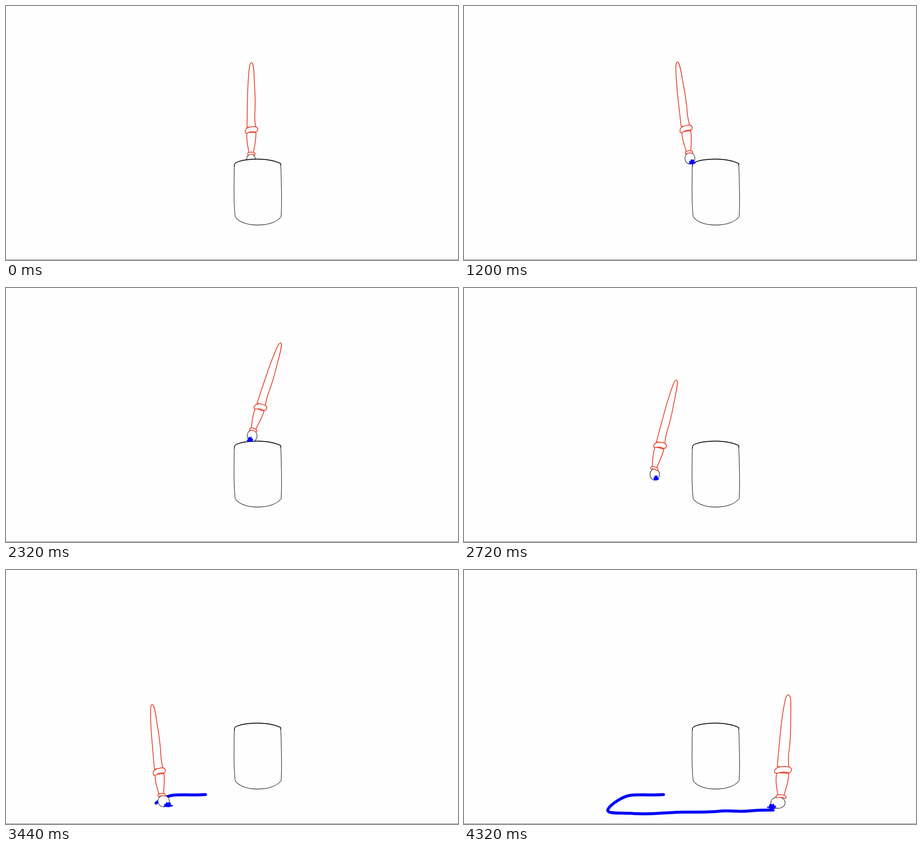
An HTML page for the animation above (4.4 s loop, 997 by 561 pixels).

```html
<!DOCTYPE html>
<html lang="en">
<head>
<meta charset="utf-8">
<title>Paintbrush</title>
<style>
  html, body { margin: 0; width: 100%; height: 100%; overflow: hidden; background: #fefefe; }
  svg { display: block; }
  path, ellipse { fill: #fefefe; stroke-linecap: round; stroke-linejoin: round; vector-effect: non-scaling-stroke; }
  .ink { stroke: #333336; stroke-width: 1.3; }
  #handle path { stroke: #e83824; stroke-width: 1.7; }
  #blob { fill: #0404fa; stroke: #0404fa; stroke-width: 1.5; }
  #trail { fill: none; stroke: #0404fa; stroke-width: 6.5; }
</style>
</head>
<body>
<svg width="997" height="561" viewBox="0 0 997 561">
  <path d="M0 560.5H997" stroke="#777"/>
  <g id="bucket">
    <path class="ink" d="M504 353C503 349 505 347 509 345C530 336 580 335 606 348C607 380 609 420 607 465C590 490 520 490 505.500 465C502 435 503 400 503.500 353Z"/>
    <path d="M504 354C503 349 505 347 509 345C530 336 580 335 606 348V352" style="fill:none" stroke="#222" stroke-width="1.8"/>
  </g>
  <path id="trail" pathLength="512" d="M440 496C415 498 385 495 365 498C345 502 318 522 317 531C318 539 345 536 375 538S450 536 470 535S530 536 560 533S600 535 630 532S670 531 688 530"/>
  <g id="bristles">
    <ellipse id="ball" class="ink" ry="12.5" cy="12.5"/>
    <path id="blob" d="M-1 .5L-.5 .2L-.4-.8L-.1-.9L.1-.4L.4-1L.5-.2L.95 0L.7 .4L1 .9L-.2 1Z"/>
  </g>
  <g id="handle">
    <path d="M-10-60C-9-100-9-140-7-165C-5-190-4-204 .5-204C5-204 6-190 7-165C9-130 10-110 8-85C8-75 9-68 10-60Z"/>
    <path d="M-5.500-3C-8-20-12-28-10-48H11C11-30 8-20 5-3Z"/>
    <path d="M-14-50C-14-58-5-61 3-61C10-62 15-60 15-55C15-49 9-49 5-50C-3-51-6-47-10-46.500C-13-46-14-48-14-50Z"/>
    <path d="M-7-3C-4-5 4-5 7-3C10-2 9 3 7 2C3 0-3 0-6 2C-9 3-9-2-7-3Z"/>
  </g>
</svg>
<script>
const [bucket, trail, bristles, ball, blob, handle] =
  ['bucket', 'trail', 'bristles', 'ball', 'blob', 'handle'].map(id => document.getElementById(id));

// Drawings change about every 1.6 units of 80 ms
const LOOP = 4400, UNIT = 80, PACE = 1.6;
const PAINT_START = 24, TURN = 28;

// Turning points: drawing, ferrule x and y, lean in degrees, sideways bend of the bristles
const poses = [
  [0, 541, 327, 0, -.1],
  [7, 534, 327, 0, .1],
  [9, 496, 324, -7.4, .5],
  [11, 471, 316, 19, -.4],
  [13, 467, 309, 34, -.8],
  [15, 509, 325, 26, -.6],
  [18, 545, 314, 17.4, -.45],
  [19, 474, 318, 20, -.3],
  [22, 392, 440, 11, .6],
  [24, 411, 474, -9.7, 1.1],
  [27, 343, 498, -6, 1],
  [30, 500, 510, 28.4, -1.4],
  [31, 603, 513, 37, -1.4],
  [34, 699, 501.5, 4, -1]
];

function poseAt(k) {
  const i = Math.max(1, poses.findIndex(pose => pose[0] >= k));
  const a = poses[i - 1], b = poses[i], f = (k - a[0]) / (b[0] - a[0]);
  return a.slice(1).map((v, j) => v + (b[j + 1] - v) * f);
}

function smoothstep(from, to, v) {
  const f = Math.min(1, Math.max(0, (v - from) / (to - from)));
  return f * f * (3 - 2 * f);
}

function draw(k) {
  const [x, y, lean, bend] = poseAt(k);
  const near = smoothstep(TURN - 1, TURN + 2, k); // the brush comes closer while painting
  const width = .95 + .33 * near, length = .99 + .12 * near;
  const press = Math.abs(bend);

  handle.setAttribute('transform', `translate(${x} ${y}) rotate(${lean}) scale(${width} ${length})`);
  bristles.setAttribute('transform', `translate(${x} ${y})`);
  ball.setAttribute('cx', 5 * bend * width);
  ball.setAttribute('rx', 10 * width + 3 * press);
  const half = -Math.sign(bend) * (4 + 6 * Math.min(1, press));
  blob.setAttribute('transform', `translate(${16 * bend * width} 20) scale(${half} 5)`);

  // Even pace to the left, then the paint follows the brush to the right
  const painted = k < TURN ? 38 * Math.max(0, k - PAINT_START) : x - 193;
  trail.setAttribute('stroke-dasharray', `${painted} 999`);
  trail.style.opacity = painted > 0 ? 1 : 0;
  // While dipping, the bristles are inside the bucket
  (k < 9 ? bucket : handle).before(bristles);
}

function tick() {
  const units = Math.floor(performance.now() % LOOP / UNIT);
  draw(Math.ceil((units + .5) / PACE) - 1);
  requestAnimationFrame(tick);
}
tick();
</script>
</body>
</html>
```
